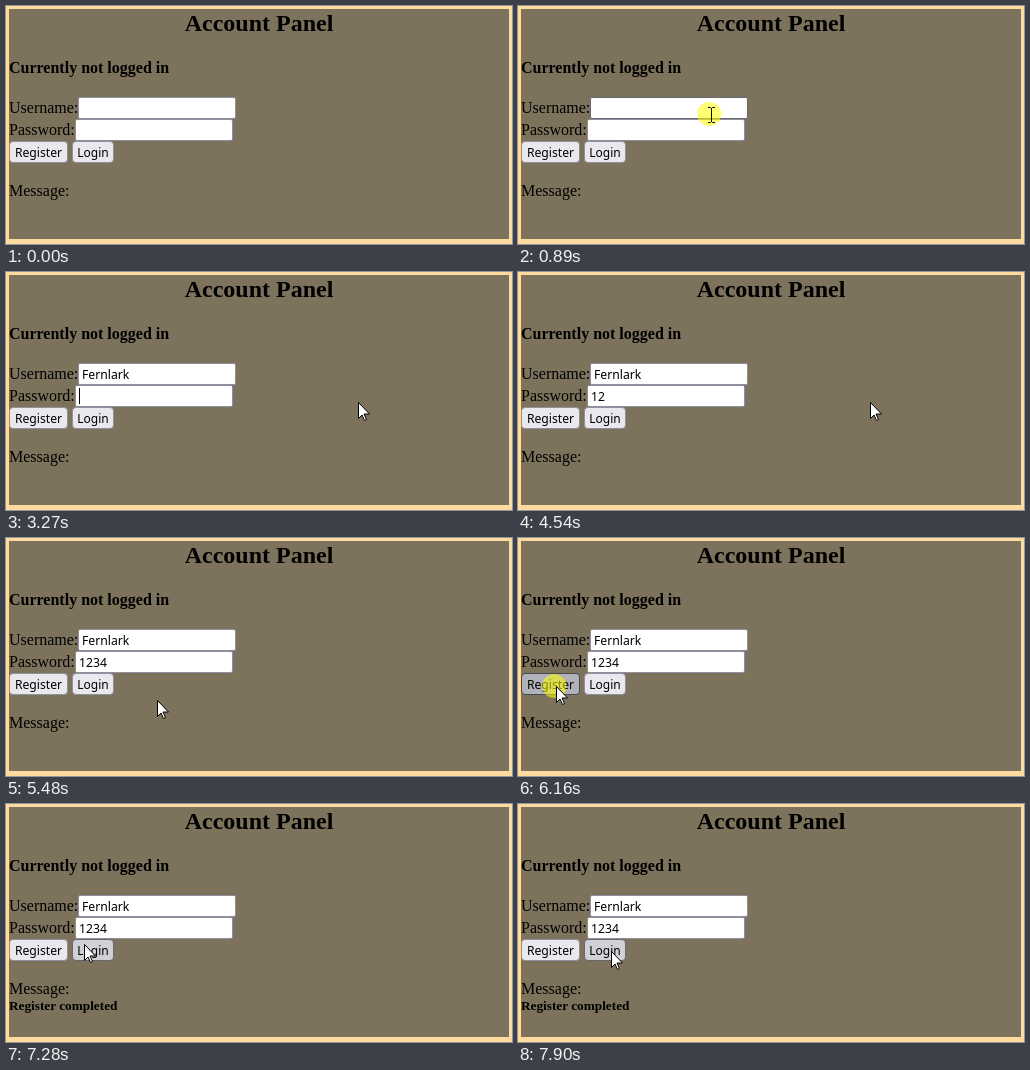
An HTML page that plays this animation: 506 px wide and 238 px high, repeating every 8 s.

```html
<!DOCTYPE html>
<html lang="en">
<head>
<meta charset="utf-8">
<title>Account Panel</title>
<style>
  html, body { margin: 0; width: 100%; height: 100%; overflow: hidden; background: #ffdb9f; }
  svg { display: block; }
  text { font: 16px "Liberation Serif", serif; }
  .b { font-weight: bold; }
  .ui { font: 12.2px "Noto Sans", "Open Sans", sans-serif; }
  .mid { text-anchor: middle; }
  .field { fill: #fff; stroke: #8f8f9d; }
  .button { fill: #e9e9ed; stroke: #8f8f9d; }
  .hover { stroke: #676774; }
  .button.hover { fill: #d0d0d7; }
  .button.active { fill: #b1b1b9; stroke: #484851; }
</style>
</head>
<body>
<svg width="506" height="238">
  <rect x="3" y="3" width="500" height="230" fill="#7d725b"/>
  <text class="b mid" x="253" y="25" style="font-size:24px">Account Panel</text>
  <text class="b" x="3" y="67">Currently not logged in</text>
  <text x="3" y="107">Username:</text>
  <text x="3" y="129">Password:</text>
  <rect id="userBox" class="field" x="72.5" y="91.5" width="157" height="21" rx="1.5"/>
  <rect id="passBox" class="field" x="69.5" y="113.5" width="157" height="21" rx="1.5"/>
  <text id="user" class="ui" x="76" y="107"></text>
  <text id="pass" class="ui" x="73" y="129"></text>
  <rect id="caret" width="1" height="16"/>
  <rect id="register" class="button" x="3.5" y="135.5" width="58" height="21" rx="3.5"/>
  <rect id="login" class="button" x="66.5" y="135.5" width="41" height="21" rx="3.5"/>
  <text class="ui mid" x="32.5" y="151">Register</text>
  <text class="ui mid" x="87" y="151" style="font-size:12px">Login</text>
  <text x="3" y="190">Message:</text>
  <text id="message" class="b" x="3" y="206" style="font-size:13.28px">Register completed</text>
  <g id="pointer">
    <circle id="halo" cx="-2" r="12" fill="#ff0" opacity=".55"/>
    <path id="arrow" d="M.5.5v16L4 13l2.5 5.5 2-1L6 12h5.5z" fill="#fff" stroke="#000"/>
    <path id="beam" d="M-3-6.5h2.5l1 1 1-1H4M-3 8.5h2.5l1-1 1 1H4M.5-6v14" fill="none" stroke="#000"/>
  </g>
</svg>
<script>
const LOOP = 8000, STEP = 70, BLINK = 200, ENTER = 330, BLUR = 5410;
const FOCUS_CLICK = 820, REGISTER_CLICK = 6160, PRESS = 200;
const $ = id => document.getElementById(id);

const glides = [
  { from: 330, to: 890, x: 193, y: 108 },
  { from: 1100, to: 1370, x: 352, y: 130 },
  { from: 5270, to: 5480, x: 151, y: 162 },
  { from: 5480, to: 5690, x: 55, y: 177 },
  { from: 5690, to: 5960, x: 38, y: 148 },
  { from: 6360, to: 6570, x: 51, y: 127 },
  { from: 6930, to: 7560, x: 100, y: 151 },
  { from: 7690, to: 7900, x: 93, y: 147 }
];

// an empty text only moves the focus
const bursts = [
  { field: "user", at: 1170, gap: 0, text: "" },
  { field: "user", at: 1770, gap: 100, text: "Fer" },
  { field: "user", at: 2240, gap: 85, text: "nlark" },
  { field: "pass", at: 2850, gap: 0, text: "" },
  { field: "pass", at: 3740, gap: 200, text: "12" },
  { field: "pass", at: 4740, gap: 200, text: "34" }
];

const within = (t, start, length) => t >= start && t < start + length;
const show = (id, on) => $(id).style.display = on ? "" : "none";

function pointerAt(t) {
  let x = 244, y = 164;
  for (const g of glides) {
    if (t < g.from) break;
    const p = t >= g.to ? 1 : Math.floor((t - g.from) / STEP) * STEP / (g.to - g.from);
    x += (g.x - x) * p;
    y += (g.y - y) * p;
  }
  return [Math.round(x), Math.round(y)];
}

function drawTyping(t) {
  const typed = { user: "", pass: "" };
  let focus, lastKey;
  for (const { field, at, gap, text } of bursts) {
    if (t < at) break;
    const count = gap ? Math.min(text.length, 1 + Math.floor((t - at) / gap)) : 0;
    typed[field] += text.slice(0, count);
    focus = field;
    lastKey = at + Math.max(0, count - 1) * gap;
  }
  for (const id in typed) $(id).textContent = typed[id];

  // each key press restarts the blinking
  show("caret", focus && t < BLUR && (t - lastKey) % (2 * BLINK) < BLINK);
  if (!focus) return;
  const field = $(focus);
  $("caret").setAttribute("x", Math.round(+field.getAttribute("x") + field.getComputedTextLength()));
  $("caret").setAttribute("y", field.getAttribute("y") - 13);
}

function drawPointer(t) {
  const [x, y] = pointerAt(t), visible = t >= ENTER;
  const over = id => {
    const box = $(id).getBBox();
    return visible && within(x, box.x - .5, box.width + 1) && within(y, box.y - .5, box.height + 1);
  };
  const hover = (id, on) => $(id).classList.toggle("hover", on);
  const beam = over("userBox") || over("passBox");
  const onLabel = visible && !beam && within(x, 3, 69);

  // a label lights up its field
  hover("userBox", over("userBox") || onLabel && within(y, 91, 22));
  hover("passBox", over("passBox") || onLabel && within(y, 113, 22));
  hover("register", over("register"));
  hover("login", over("login"));
  $("register").classList.toggle("active", within(t, REGISTER_CLICK, PRESS));

  $("pointer").setAttribute("transform", `translate(${x} ${y})`);
  show("pointer", visible);
  show("beam", beam);
  show("arrow", !beam);
  show("halo", [FOCUS_CLICK, REGISTER_CLICK].some(click => within(t, click, PRESS)));
}

function draw(t) {
  drawTyping(t);
  drawPointer(t);
  show("message", t >= REGISTER_CLICK + PRESS);
}

let begin;
function tick(now) {
  begin ??= now;
  draw((now - begin) % LOOP);
  requestAnimationFrame(tick);
}
draw(0);
requestAnimationFrame(tick);
</script>
</body>
</html>
```
